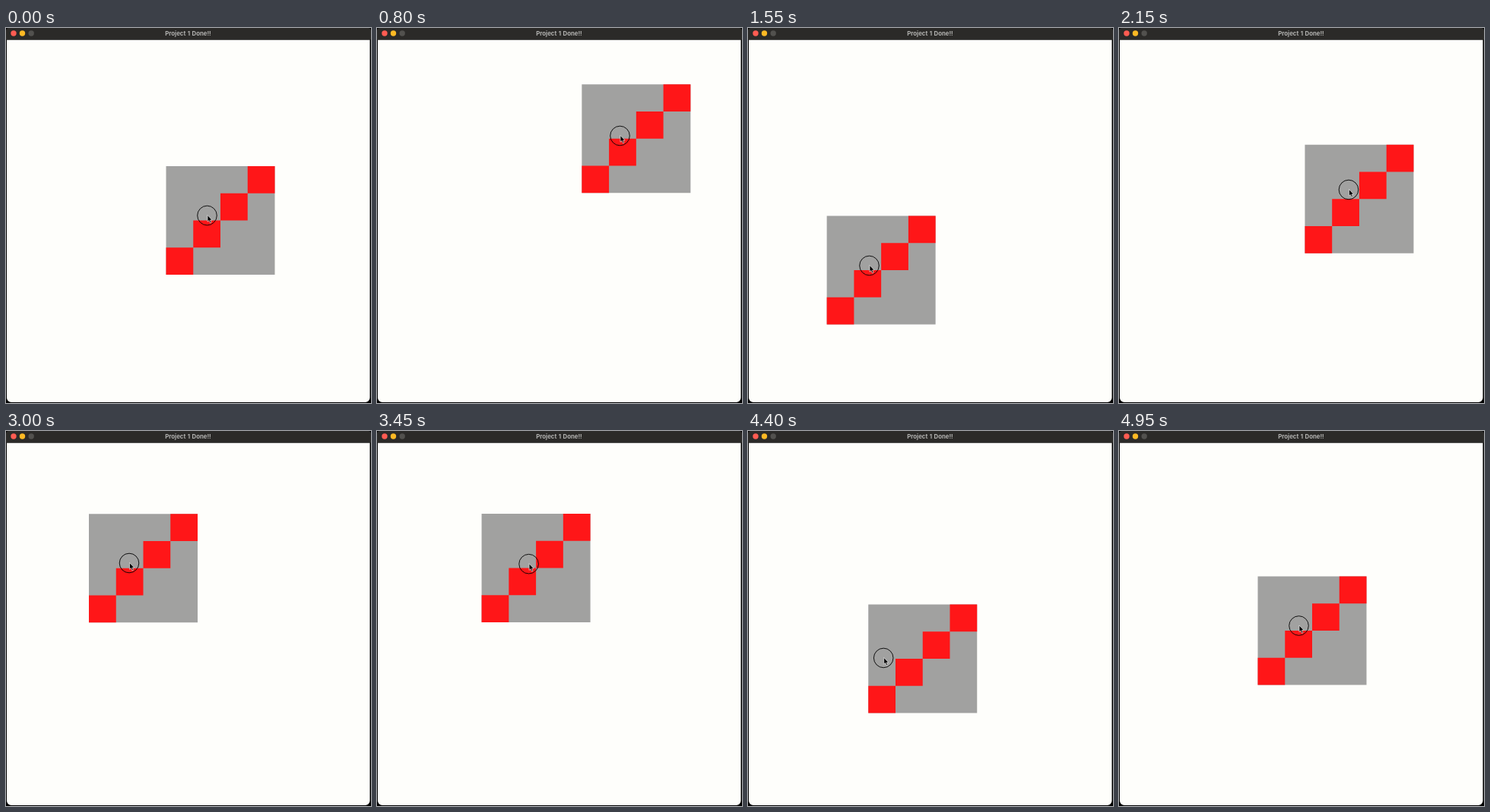
An HTML page that plays this animation: 480 by 494 pixels, repeating every 5 s.

```html
<!DOCTYPE html>
<html lang="en">
<head>
<meta charset="utf-8">
<title>Project 1 Done!!</title>
<style>
  html, body { margin: 0; height: 100%; overflow: hidden; background: #000; }
  svg { display: block; width: 480px; height: 494px; }
  text { font: bold 7.8px Inter, sans-serif; word-spacing: .6px; fill: #b2b2b0; text-anchor: middle; }
</style>
</head>
<body>
<svg viewBox="0 0 480 494">
  <path d="M1 15.5H478.5V487a6 6 0 0 1-6 6H7a6 6 0 0 1-6-6z" fill="#fefefb"/>
  <path d="M0 15.5V4a4 4 0 0 1 4-4H476a4 4 0 0 1 4 4V15.5z" fill="#2b2a28"/>
  <circle cx="10" cy="7" r="3.7" fill="#ff5c52"/>
  <circle cx="21.5" cy="7" r="3.7" fill="#fdb924"/>
  <circle cx="33.2" cy="7" r="3.7" fill="#52514e"/>
  <text x="239.5" y="9.7">Project 1 Done!!</text>
  <g id="board">
    <path d="M0 0H143V143H0z" fill="#a1a1a0"/>
    <path id="diagonal" fill="#ff1618"/>
  </g>
  <g id="pointer">
    <circle r="12.8" fill="none" stroke="#000" stroke-width=".9"/>
    <path d="M.5-.5V8.2L2.4 6.5 3.9 9.8 5.4 9.1 4 6H6.6z" fill="#000" stroke="#fff" stroke-width=".6"/>
  </g>
</svg>
<script>
  const LOOP = 5000, STEP = 50, CELL = 143 / 4;
  const GRIP = { x: 54, y: 65 }; // where the resting pointer holds the board

  // turning points of the drag
  const path = [
    [0, 264.5, 247], [800, 319.5, 142], [1550, 159.5, 313],
    [2150, 302, 213], [3000, 162, 174], [3900, 282, 212.5],
    [4150, 330, 260], [4500, 130, 306], [4950, 236.5, 256.5]
  ].map(([t, x, y]) => ({ t, x, y }));

  const slope = (a, b, axis) => (b[axis] - a[axis]) / (b.t - a.t);

  // speed at a turning point: neighbouring slopes, the shorter span weighing more
  function speed(i, axis) {
    const a = path[i - 1], p = path[i], b = path[i + 1];
    if (!a || !b) return 0;
    return (slope(a, p, axis) * (b.t - p.t) + slope(p, b, axis) * (p.t - a.t)) / (b.t - a.t);
  }

  // smooth position and velocity along one axis
  function motion(t, axis) {
    const i = path.findLastIndex((p, n) => p.t <= t && n < path.length - 1);
    const a = path[i], b = path[i + 1], span = b.t - a.t, u = (t - a.t) / span;
    const d = b[axis] - a[axis], m = speed(i, axis) * span, n = speed(i + 1, axis) * span;
    const c2 = 3 * d - 2 * m - n, c3 = m + n - 2 * d;
    return {
      pos: a[axis] + u * (m + u * (c2 + u * c3)),
      vel: (m + u * (2 * c2 + 3 * u * c3)) / span
    };
  }

  const find = id => document.getElementById(id);
  const place = (id, x, y) => find(id).setAttribute('transform', `translate(${x} ${y})`);

  let cells = '';
  for (let i = 0; i < 4; i++) cells += `M${i * CELL} ${(3 - i) * CELL}h${CELL}v${CELL}h${-CELL}z`;
  find('diagonal').setAttribute('d', cells);

  // the board trails the pointer by one step
  function draw() {
    const t = Math.floor(performance.now() % LOOP / STEP) * STEP;
    const x = motion(t, 'x'), y = motion(t, 'y');
    place('pointer', x.pos, y.pos);
    place('board', x.pos - x.vel * STEP - GRIP.x, y.pos - y.vel * STEP - GRIP.y);
    requestAnimationFrame(draw);
  }
  draw();
</script>
</body>
</html>
```
